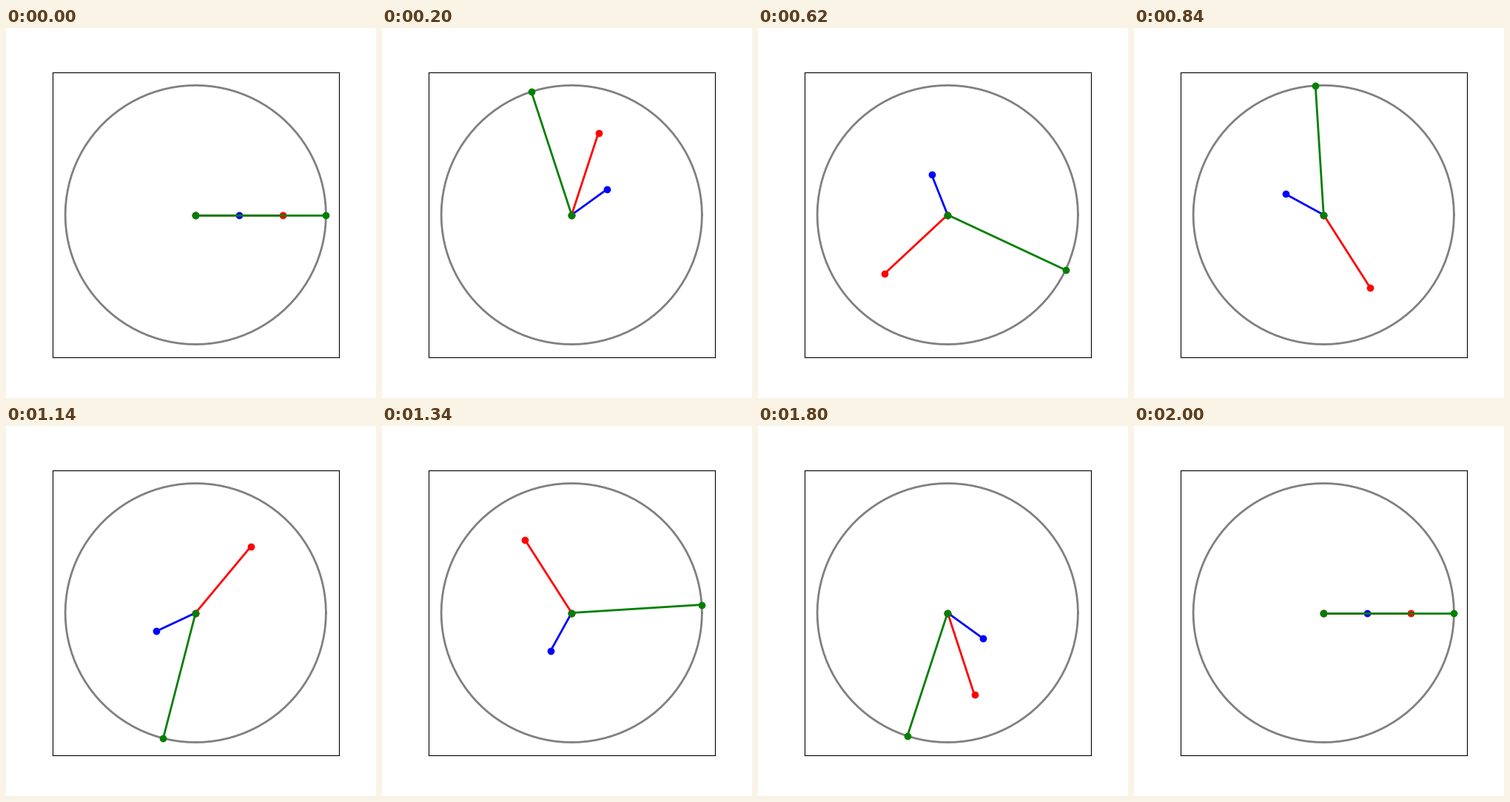
Animation, 500 px wide and 500 px high, one loop 2.02 s. Source, as a matplotlib script:

```python
import numpy as np
import matplotlib.pyplot as plt
from matplotlib.animation import FuncAnimation

STEPS = 101
angles = np.linspace(0, 2 * np.pi, STEPS)

fig, ax = plt.subplots(figsize=(5, 5), dpi=100)
fig.subplots_adjust(left=0.125, right=0.9, bottom=0.11, top=0.88)
ax.set(xlim=(-3.3, 3.3), ylim=(-3.3, 3.3), xticks=[], yticks=[])

ax.plot(3 * np.cos(angles), 3 * np.sin(angles), color="gray", lw=2)

# Each hand's length is also its number of turns per loop.
hands = [(k, ax.plot([], [], "o-", color=color, lw=2, ms=6)[0])
         for k, color in enumerate(("blue", "red", "green"), start=1)]


def update(i):
    for k, line in hands:
        a = k * angles[i]
        line.set_data([0, k * np.cos(a)], [0, k * np.sin(a)])
    return [line for _, line in hands]


anim = FuncAnimation(fig, update, frames=STEPS, interval=20,
                     repeat=True, repeat_delay=0)
plt.show()
```
